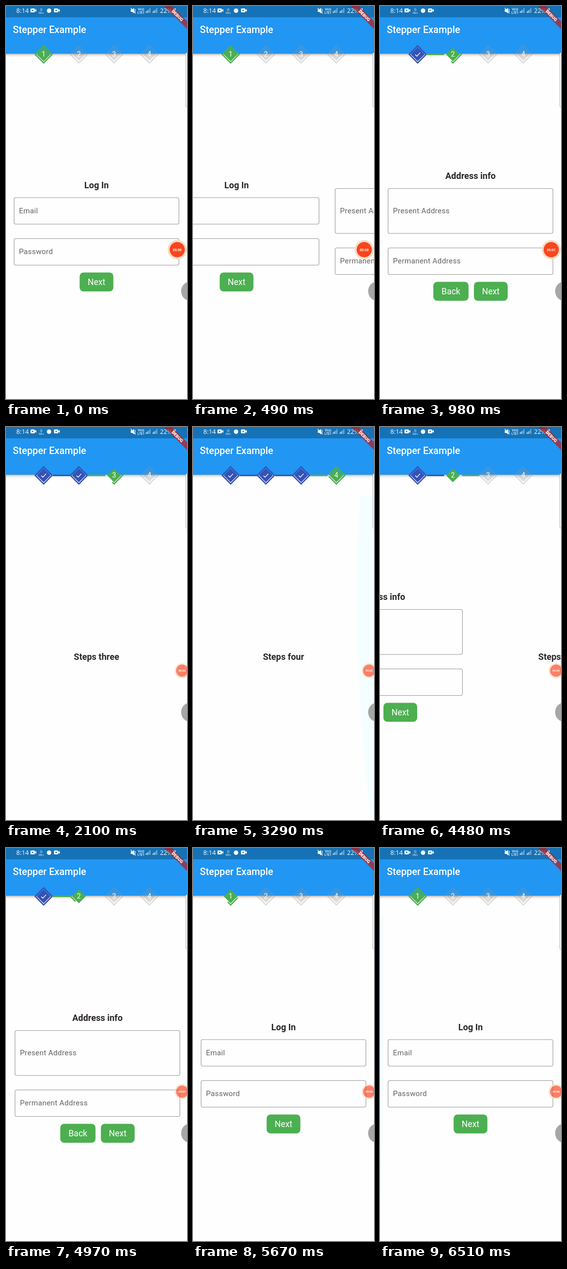
An HTML page that plays this animation: 370x800 px, repeating every 6580 ms.

```html
<!DOCTYPE html>
<html lang="en">
<head>
<meta charset="utf-8">
<title>Stepper Example</title>
<style>
  html, body { margin: 0; width: 100%; height: 100%; overflow: hidden; background: #fefefe; }
  svg { display: block; width: 370px; height: 800px; font-family: Roboto, sans-serif; }
  .title { font-size: 18px; font-weight: 700; fill: #2b2629; text-anchor: middle; }
  .label { font-size: 15.2px; letter-spacing: .3px; fill: #626262; }
  .field { fill: none; stroke: #9b9793; stroke-width: 1.1; }
  .button { font-size: 17.5px; fill: #fff; text-anchor: middle; }
  .status { font-family: "Open Sans", sans-serif; fill: #fff; }
</style>
</head>
<body>
<svg id="stage" viewBox="0 0 370 800">
  <defs>
    <linearGradient id="shadow" x2="0" y2="1">
      <stop offset="0" stop-color="#000" stop-opacity=".32"/>
      <stop offset=".4" stop-color="#000" stop-opacity=".1"/>
      <stop offset="1" stop-color="#000" stop-opacity="0"/>
    </linearGradient>
    <g id="camera" fill="#fff">
      <rect width="9" height="8" rx="1.5"/>
      <path d="M8 4 L12 1 V7 Z"/>
      <circle cx="4.5" cy="4" r="1.4" fill="#1672b6"/>
    </g>
    <g id="signal" fill="#fff">
      <path d="M0 7h1.3v3H0zM2.6 5h1.3v5H2.6z"/>
      <path d="M5.2 3h1.3v7H5.2zM7.8 0h1.3v10H7.8z" opacity=".6"/>
    </g>
  </defs>
  <rect width="370" height="800" fill="#fefefe"/>
  <path id="glowRight" d="M0 139 H-27 Q-51 400 -7 800 H0 Z" fill="#f5feff"/>
  <path id="glowLeft" d="M0 139 H9 Q10 400 0 800 Z" fill="#f6fdfe"/>
  <g id="pages"></g>

  <rect y="97" width="370" height="7" fill="url(#shadow)"/>
  <rect width="370" height="97" fill="#2196f3"/>
  <rect width="370" height="23" fill="#1672b6"/>
  <text x="14" y="55" font-size="19.8" font-weight="500" fill="#fff">Stepper Example</text>

  <g class="status">
    <text x="21" y="14" font-size="13">8:14</text>
    <use href="#camera" x="50" y="5"/>
    <text x="72" y="10" font-size="8" text-anchor="middle">0</text>
    <text x="72" y="16" font-size="5" text-anchor="middle">KB/s</text>
    <circle cx="88" cy="9.5" r="4.5"/>
    <use href="#camera" x="98" y="5"/>
    <path d="M255 7h3l4-3v11l-4-3h-3z"/>
    <path d="M255 4l10 11M264 6v6" stroke="#fff" stroke-width="1.2"/>
    <text x="276" y="9" font-size="7" font-weight="600" text-anchor="middle">Vo))</text>
    <text x="276" y="15.5" font-size="6.5" font-weight="600" text-anchor="middle">LTE1</text>
    <use href="#signal" x="286" y="4"/>
    <use href="#signal" x="300" y="4"/>
    <text x="315" y="14" font-size="12.5">22%</text>
    <rect x="341" y="5" width="6" height="10" rx="1"/>
  </g>
  <g transform="translate(370 0) rotate(45)">
    <rect x="-40" y="22" width="80" height="11" fill="#b71c1c" fill-opacity=".72"/>
    <text y="30.7" font-size="9" font-weight="900" fill="#fff" text-anchor="middle">DEBUG</text>
  </g>

  <g id="steps"></g>

  <path d="M371 95H370Q367.5 95 367.5 98V203Q367.5 206 370 206H371" fill="#fff" stroke="#b5b5b5"/>
  <circle cx="378" cy="580.5" r="20" fill="#a6a6a6"/>
  <g id="recorder">
    <circle r="19.5" fill="#f5dcc6"/>
    <circle r="15.5" fill="#fb451d"/>
    <text id="clock" y="2.5" font-size="7" font-weight="700" fill="#fff" text-anchor="middle"></text>
  </g>
</svg>
<script>
const LOOP = 6580, TICK = 70, WIDTH = 370;
const GREEN = [76, 175, 80, 1], INDIGO = [53, 82, 181, 1], CLEAR = [76, 175, 80, 0];
const STEP_Y = 98.5, stepX = i => 77 + 72 * i;

// Swipes between pages: start, duration, from, to
const swipes = [
  [270, 660, 0, 1], [1390, 660, 1, 2], [2360, 660, 2, 3],
  [3710, 340, 3, 2], [4280, 400, 2, 1], [4942, 660, 1, 0],
];
// Ends of the moving border (in turns) by time since the step became active
const ringTail = [[100, .23], [380, .23], [490, .6], [600, .8]];
const ringHead = [[100, .23], [380, .55], [490, .79], [600, 1.72], [700, 1.8]];

const $ = id => document.getElementById(id);
const clamp = v => Math.min(1, Math.max(0, v));
const smooth = v => (v = clamp(v), v * v * (3 - 2 * v));
const ramp = (t, start, end) => smooth((t - start) / (end - start));
const rgba = c => `rgba(${c.join()})`;
const mix = (a, b, k) => a.map((v, i) => v + (b[i] - v) * k);

function track(keys, t) {
  let value = keys[0][1];
  for (let i = 1; i < keys.length; i++) {
    const [t0, v0] = keys[i - 1], [t1, v1] = keys[i];
    value += (v1 - v0) * clamp((t - t0) / (t1 - t0));
  }
  return value;
}

function add(parent, tag, attrs, text) {
  const node = document.createElementNS("http://www.w3.org/2000/svg", tag);
  for (const key in attrs) node.setAttribute(key, attrs[key]);
  if (text) node.textContent = text;
  return parent.appendChild(node);
}

const diamond = r => `M0 ${-r}L${r} 0L0 ${r}L${-r} 0Z`;

function addPage(title, y) {
  const page = add($("pages"), "g");
  add(page, "text", { class: "title", x: 185, y }, title);
  return page;
}
function addField(page, y, height, label) {
  add(page, "rect", { class: "field", x: 16.5, y, width: 337, height, rx: 3.5 });
  add(page, "text", { class: "label", x: 26.5, y: y + height / 2 + 4.7 }, label);
}
function addButton(page, x, y, width, label) {
  add(page, "rect", { x, y, width, height: 38.5, rx: 8, fill: "#4caf50" });
  add(page, "text", { class: "button", x: x + width / 2, y: y + 25 }, label);
}

const login = addPage("Log In", 371);
addField(login, 390, 54, "Email");
addField(login, 473.5, 54, "Password");
addButton(login, 150.5, 542.5, 69, "Next");

const address = addPage("Address info", 352);
addField(address, 371.5, 91.5, "Present Address");
addField(address, 492.5, 54, "Permanent Address");
addButton(address, 109, 561.5, 72, "Back");
addButton(address, 192, 561.5, 69, "Next");

const pages = [login, address, addPage("Steps three", 474), addPage("Steps four", 474)];

const lines = [0, 1, 2].map(i => add($("steps"), "rect",
  { x: stepX(i) + 19, y: STEP_Y - 1.5, width: 35, height: 3 }));

const steps = pages.map((_, i) => {
  const group = add($("steps"), "g", { transform: `translate(${stepX(i)} ${STEP_Y})` });
  return {
    ring: add(group, "path", { d: diamond(17.3), fill: "none", "stroke-width": 2.6, pathLength: 1 }),
    body: add(group, "path", { d: diamond(13), "stroke-width": 1.5, "stroke-linejoin": "round" }),
    digit: add(group, "text", { y: 4.7, "font-size": 14, fill: "#fff", "text-anchor": "middle" }, String(i + 1)),
    check: add(group, "path", { d: "M-5 .5L-1.6 3.8L5 -3.4", fill: "none", stroke: "#fff", "stroke-width": 1.4 }),
  };
});

function lineColor(i, active) {
  return i + 1 < active ? INDIGO : i + 1 === active ? GREEN : CLEAR;
}

function drawSteps(active, previous, age) {
  steps.forEach(({ ring, body, digit, check }, i) => {
    const done = i < active, current = i === active;
    const color = done ? rgba(INDIGO) : current ? rgba(GREEN) : "rgba(150,150,150,.32)";
    ring.setAttribute("stroke", color);
    body.setAttribute("fill", color);
    body.setAttribute("stroke", done || current ? color : "none");
    digit.setAttribute("visibility", done ? "hidden" : "visible");
    check.setAttribute("visibility", done ? "visible" : "hidden");

    const tail = current ? track(ringTail, age) : 0;
    const length = current ? track(ringHead, age) - tail : 1;
    ring.setAttribute("stroke-dasharray", length > .999 ? "none" : `${length} ${1 - length}`);
    ring.setAttribute("stroke-dashoffset", -tail);
    ring.setAttribute("visibility", length > .001 ? "visible" : "hidden");
  });
  const k = clamp((age - 60) / 200);
  lines.forEach((line, i) =>
    line.setAttribute("fill", rgba(mix(lineColor(i, previous), lineColor(i, active), k))));
}

function render(t) {
  let position = 0, active = 0, previous = 0, since = -LOOP;
  for (const [start, duration, from, to] of swipes) {
    if (t >= start) position = from + (to - from) * smooth((t - start) / duration);
    if (t >= start + duration / 2) {
      previous = from;
      active = to;
      since = start + duration / 2;
    }
  }
  pages.forEach((page, i) => {
    const x = (i - position) * WIDTH;
    page.setAttribute("transform", `translate(${x} 0)`);
    page.setAttribute("visibility", Math.abs(x) < WIDTH ? "visible" : "hidden");
  });
  drawSteps(active, previous, t - since);

  const right = ramp(t, 3020, 3230) * (1 - ramp(t, 3400, 3680));
  const left = 3 * ramp(t, 5700, 5920) - 2 * ramp(t, 6040, 6300);
  $("glowRight").setAttribute("transform", `translate(370 0) scale(${right} 1)`);
  $("glowLeft").setAttribute("transform", `scale(${left} 1)`);

  const docked = ramp(t, 1500, 1720);
  $("recorder").setAttribute("transform", `translate(${350 + 10 * docked} 496) scale(${1 - .2 * docked})`);
  $("recorder").setAttribute("opacity", 1 - .33 * docked);
  $("clock").textContent = "00:0" + Math.floor((t + 100) / 1000);
}

const begin = performance.now();
function loop(now) {
  const t = Math.max(0, now - begin) % LOOP;
  render(Math.floor(t / TICK) * TICK);
  requestAnimationFrame(loop);
}
render(0);
requestAnimationFrame(loop);
</script>
</body>
</html>
```
